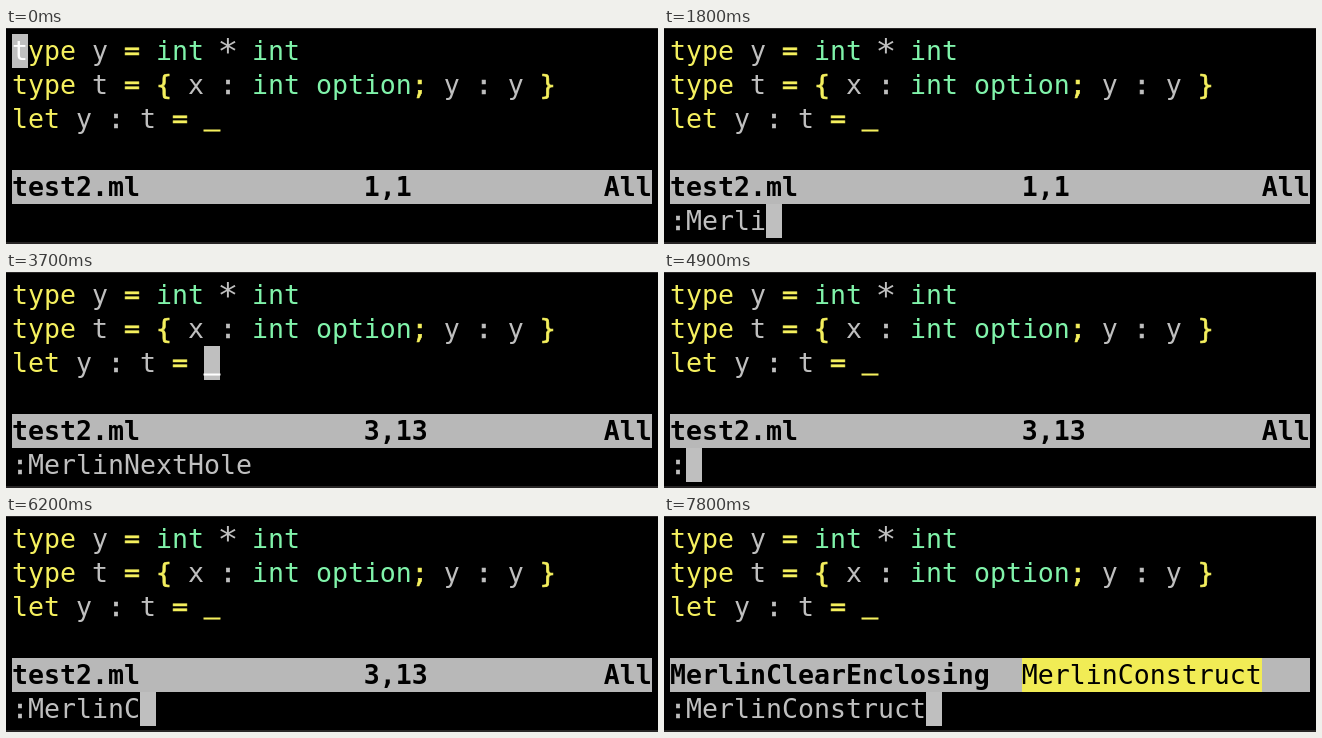
Write an HTML page that moves like this. It is 652 by 216 pixels and loops after 8 s.

```html
<!DOCTYPE html>
<html lang="en">
<head>
<meta charset="utf-8">
<title>Editor session</title>
<style>
  html, body { margin: 0; width: 100%; height: 100%; overflow: hidden; background: #000; }
  body { box-sizing: border-box; border: solid #282626; border-width: 1px 0 2px; }
  #screen {
    position: absolute; left: 6px; top: 6px; width: 640px;
    font: 26.576px/34px "DejaVu Sans Mono", monospace; color: #bfbfbf;
  }
  .row { height: 34px; white-space: pre; }
  .row span { display: inline-block; height: 34px; vertical-align: top; }
  .k { color: #f5f05e; }
  .t { color: #80f3aa; }
  .p { -webkit-text-stroke: .7px; }
  .star { transform: scale(1.3); transform-origin: 50% 16px; }
  .hole { transform: translateY(-3px); -webkit-text-stroke: 1px; }
  .bar { background: #b8b8b8; color: #000; font-weight: bold; }
  .row .pick { background: #f1ec55; color: #000; font-weight: normal; }
  .row .cur { background: #bfbfbf; color: #fff; }
</style>
</head>
<body>
<div id="screen"></div>
<script>
const LOOP = 8000;
const view = document.getElementById('screen');
const span = (cls, text) => `<span class="${cls}">${text}</span>`;
const k = text => span('k', text);
const t = text => span('t', text);
const p = text => span('p', text);
const row = (html, cls = '') => `<div class="row ${cls}">${html}</div>`;

// [time, command line]
const typed = [
  [0, ''], [100, ':'], [900, ':M'], [1200, ':Me'], [1400, ':Mer'], [1600, ':Merl'],
  [1800, ':Merli'], [2000, ':Merlin'], [2200, ':MerlinN'], [2500, ':MerlinNextHole'],
  [4900, ':'], [5200, ':M'], [5500, ':Me'], [5700, ':Mer'], [5800, ':Merl'],
  [5900, ':Merli'], [6000, ':Merlin'], [6200, ':MerlinC'],
  [6500, ':MerlinClearEnclosing'], [7100, ':MerlinConstruct']
];
const options = ['MerlinClearEnclosing', 'MerlinConstruct'];

function statusLine(now, command) {
  if (now >= 6500)
    return options.map(o => ':' + o === command ? span('pick', o) : o).join('  ');
  const place = now < 3300 ? '1,1' : '3,13';
  return 'test2.ml'.padEnd(22) + place.padEnd(15) + 'All';
}

function render(now) {
  const command = typed.findLast(([start]) => start <= now)[1];
  const atStart = now < 100;
  const atHole = now >= 3300 && now < 4900;
  const prompt = atStart || atHole ? '' : span('cur', ' ');
  const first = atStart ? span('cur', 't') + k('ype') : k('type');
  const equals = k(p('='));
  const colon = p(':');
  return row(`${first} y ${equals} ${t('int')} ${span('star', '*')} ${t('int')}`) +
    row(`${k('type')} t ${equals} ${k(p('{'))} x ${colon} ${t('int option')}${k(p(';'))} y ${colon} y ${k(p('}'))}`) +
    row(`${k('let')} y ${colon} t ${equals} ${span(atHole ? 'cur' : 'k', span('hole', '_'))}`) +
    row('') +
    row(statusLine(now, command), 'bar') +
    row(command.replace(':', colon) + prompt);
}

let shown = '';
function frame() {
  const html = render(performance.now() % LOOP);
  if (html !== shown) view.innerHTML = shown = html;
  requestAnimationFrame(frame);
}
frame();
</script>
</body>
</html>
```
